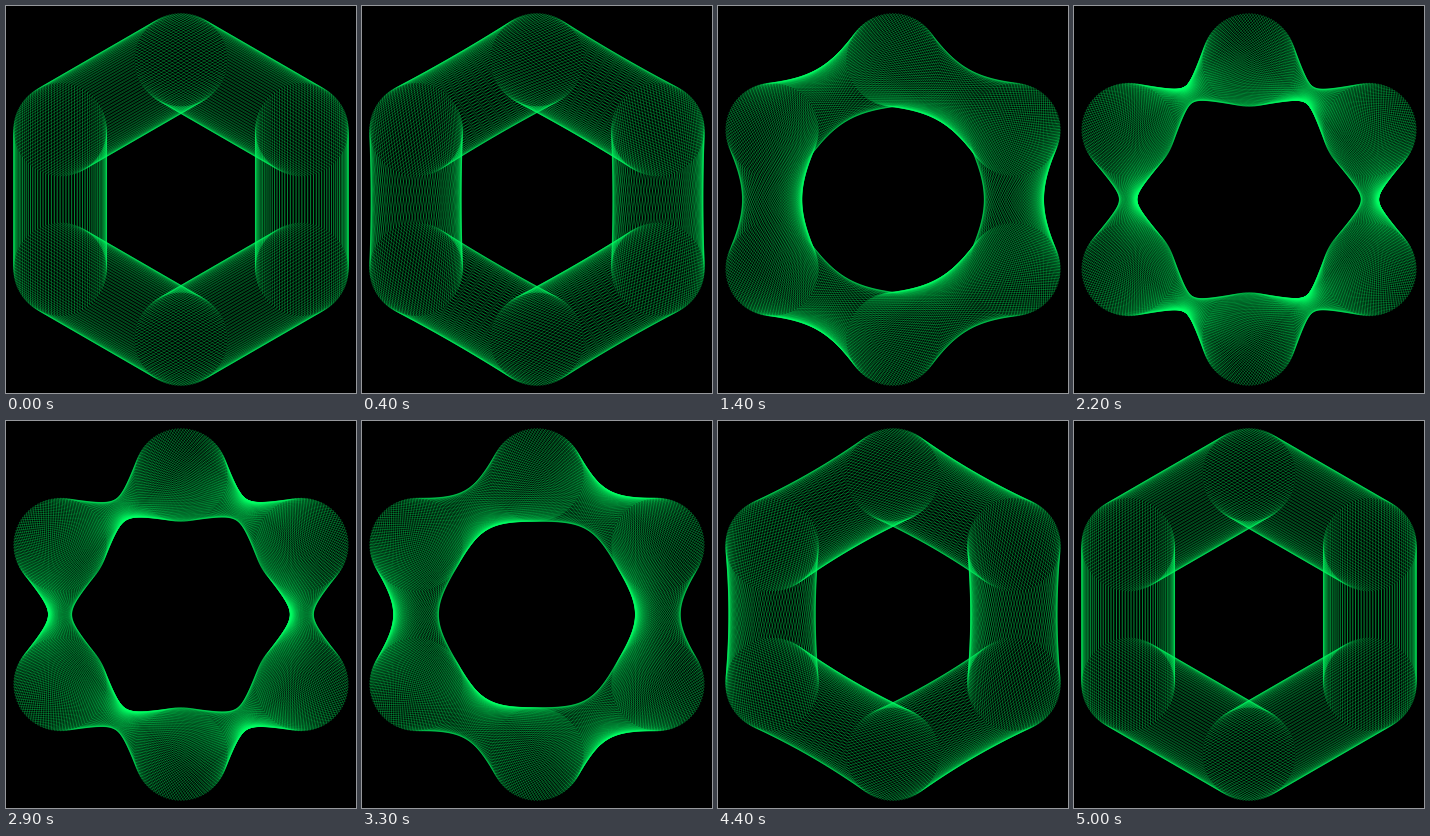
Animation of 350 by 387 pixels, one loop 5100 ms. Source, as an HTML page:

```html
<!DOCTYPE html>
<html lang="en">
<head>
<meta charset="utf-8">
<title>Twisting hexagons</title>
<style>
html, body { margin: 0; width: 100%; height: 100%; overflow: hidden; background: #000; }
svg { display: block; width: 350px; height: 387px; }
polygon { fill: none; stroke: #00ff66; stroke-width: 0.5; stroke-opacity: 0.62; }
</style>
</head>
<body>
<svg id="stage" viewBox="0 0 350 387"></svg>
<script>
const NS = 'http://www.w3.org/2000/svg';
const TAU = Math.PI * 2;
const COUNT = 100, CX = 175, CY = 193.5, BIG = 139.6, SMALL = 46.5;
const STEP = 100, STEPS = 51;

const stage = document.getElementById('stage');
const rings = Array.from({ length: COUNT }, () =>
  stage.appendChild(document.createElementNS(NS, 'polygon')));

const corners = Array.from({ length: 6 }, (_, j) => {
  const a = j * TAU / 6 - TAU / 4;
  return [CX + BIG * Math.cos(a), CY + BIG * Math.sin(a)];
});

// Every other corner turns by the twist, so each band becomes a hyperboloid.
function draw(twist) {
  rings.forEach((ring, i) => {
    const base = i * TAU / COUNT;
    ring.setAttribute('points', corners.map(([x, y], j) => {
      const a = base - (j % 2) * twist;
      return (x + SMALL * Math.cos(a)).toFixed(3) + ',' + (y + SMALL * Math.sin(a)).toFixed(3);
    }).join(' '));
  });
}

const start = performance.now();
let shown = -1;

function tick() {
  const step = Math.floor((performance.now() - start) / STEP) % STEPS;
  if (step !== shown) {
    shown = step;
    draw(TAU * step / (STEPS - 1));
  }
  requestAnimationFrame(tick);
}
tick();
</script>
</body>
</html>
```
